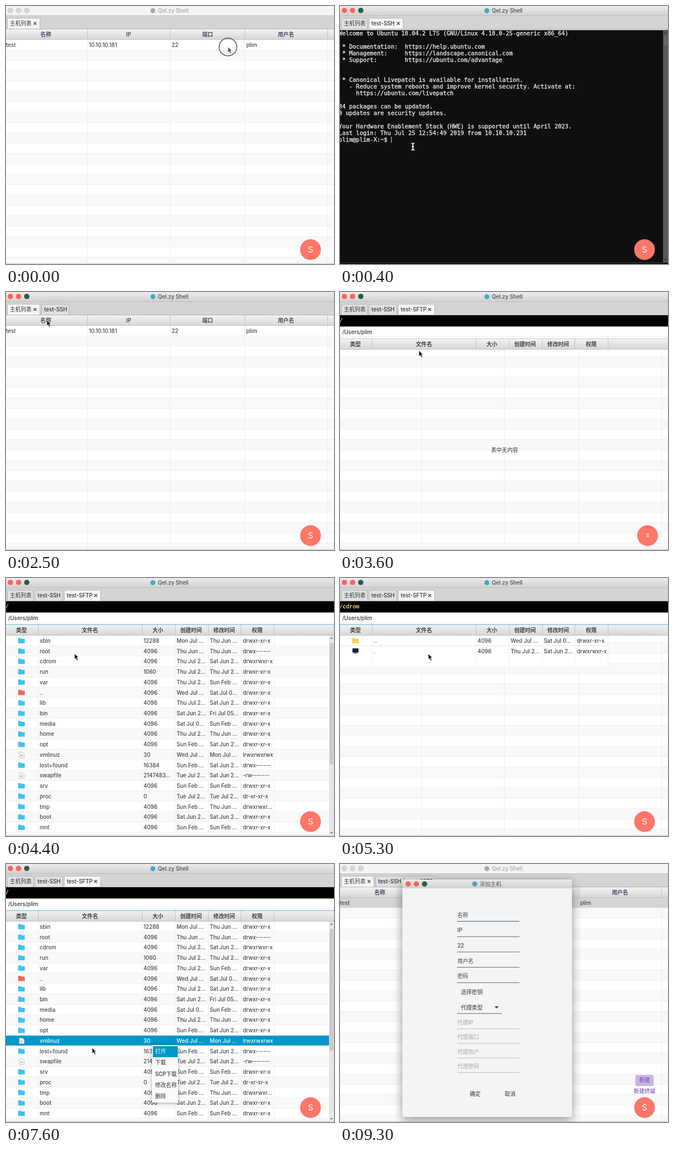
These frames come from a looping animation (594 px wide and 466 px high, 9.4 s). An HTML page:

```html
<!DOCTYPE html>
<html lang="zh">
<head>
<meta charset="utf-8">
<style>
html, body { margin: 0; width: 100%; height: 100%; overflow: hidden; background: #fff }
svg { display: block; font: 500 9.8px Inter, "Noto Sans CJK SC", "Noto Sans CJK", sans-serif }
text { white-space: pre }
.term { font: 10.47px "DejaVu Sans Mono", monospace }
.term text { stroke-width: .3px }
.path { font: bold 10px "Liberation Mono", monospace }
</style>
</head>
<body>
<svg id="stage" width="594" height="466" viewBox="0 0 594 466">
  <defs>
    <linearGradient id="bar" x2="0" y2="1"><stop stop-color="#ebebeb"/><stop offset="1" stop-color="#d0d0d0"/></linearGradient>
    <linearGradient id="head" x2="0" y2="1"><stop stop-color="#f3f3f3"/><stop offset="1" stop-color="#d6d6d6"/></linearGradient>
    <filter id="shadow" x="-20%" y="-20%" width="140%" height="140%"><feDropShadow dx="0" dy="5" stdDeviation="9" flood-opacity=".42"/></filter>
    <filter id="soft" x="-20%" y="-20%" width="140%" height="140%"><feDropShadow dx="0" dy="1" stdDeviation="3" flood-opacity=".35"/></filter>
  </defs>
  <g id="scene"></g>
</svg>
<script>
const LOOP = 9400, STEP = 100, ROW = 18.73, BLUE = '#0096c9';
const scene = document.getElementById('scene');
const APP = 'Qel.zy Shell', USER = 'plim', PROMPT = `${USER}@${USER}-X:`;

const rect = (x, y, w, h, fill, extra = '') =>
  `<rect x="${x}" y="${y}" width="${w}" height="${h}" fill="${fill}" ${extra}/>`;
const circle = (x, y, r, fill, extra = '') => `<circle cx="${x}" cy="${y}" r="${r}" fill="${fill}" ${extra}/>`;
const path = (d, fill, extra = '') => `<path d="${d}" fill="${fill}" ${extra}/>`;
const text = (x, y, s, fill = '#444', extra = '') =>
  `<text x="${x}" y="${y + 3.5}" fill="${fill}" ${extra}>${s}</text>`;
const mid = (x, y, s, fill, extra = '') => text(x, y, s, fill, 'text-anchor="middle" ' + extra);
const vline = (x, y, h, color) => rect(x, y, 1, h, color);

const lights = (x, y, active) => ['#ff6258', '#ff6258', '#2c5b48']
  .map((c, i) => circle(x + i * 14.8, y, 4.8, active ? c : '#d6d6d6', active ? '' : 'stroke="#c4c4c4" stroke-width=".6"')).join('');

function titleBar(active) {
  return rect(0, 0, 594, 18, active ? 'url(#bar)' : '#f4f4f4') + rect(0, 17, 594, 1, '#bdbdbd') +
    lights(8, 8, active) + circle(266, 8.5, 4.5, active ? '#4aa5c9' : '#aaa') +
    text(275, 8.5, APP, active ? '#4a4a4a' : '#a5a5a5');
}

function tabs(count, current) {
  const names = ['主机列表', 'test-SSH', 'test-SFTP'], widths = [48, 51, 55];
  let out = rect(0, 18, 594, 24, '#d4d4d4') + rect(0, 41, 594, 1, '#b4b4b4'), x = 2;
  for (let i = 0; i < count; i++) {
    const on = i === current, w = widths[i] + (on ? 12 : 0);
    out += path(`M${x + .5} 41V24q0-2 2-2h${w - 5}q2 0 2 2V41`, on ? '#f5f5f5' : '#e0e0e0', 'stroke="#b2b2b2"') +
      text(x + 5, 31.5, names[i], '#333');
    if (on) out += path(`M${x + w - 12} 29l5 5m0-5l-5 5`, 'none', 'stroke="#444" stroke-width="1.3"');
    x += w + 2;
  }
  return out;
}

function stripes(top, columns) {
  let out = rect(0, top, 594, 466 - top, '#fff');
  for (let i = 0, y = top; y < 463; y = top + ++i * ROW)
    out += rect(0, y, 594, ROW, i % 2 ? '#f9f9f9' : '#fff') + rect(0, y + ROW - 1, 594, 1, '#eee');
  return out + columns.map(x => vline(x, top, 466 - top, '#eee')).join('') + rect(0, 464.5, 594, 1.5, '#d5d5d5');
}

function header(y, h, columns, labels, color) {
  return rect(0, y, 594, h, 'url(#head)') + rect(0, y + h - 1, 594, 1, '#c2c2c2') +
    columns.map(x => vline(x, y, h, '#c4c4c4')).join('') +
    labels.map(([x, s]) => mid(x, y + h / 2, s, color, 'font-weight="600"')).join('');
}

const HOST_COLS = [147, 297, 432, 582];
function hostList(selection) {
  const fg = selection === BLUE ? '#fff' : '#444';
  return stripes(61, HOST_COLS) +
    header(42, 19, HOST_COLS, [[72, '名称'], [222, 'IP'], [365, '端口'], [507, '用户名']], '#4c4a62') +
    (selection ? rect(0, 61, 594, 18, selection) : '') +
    [[0, 'test'], [150, '10.10.10.181'], [300, '22'], [435, USER]].map(([x, s]) => text(x, 70, s, fg)).join('');
}

const GREETING = `Welcome to Ubuntu 18.04.2 LTS (GNU/Linux 4.18.0-25-generic x86_64)

 * Documentation:  https://help.ubuntu.com
 * Management:     https://landscape.canonical.com
 * Support:        https://ubuntu.com/advantage


 * Canonical Livepatch is available for installation.
   - Reduce system reboots and improve kernel security. Activate at:
     https://ubuntu.com/livepatch

84 packages can be updated.
0 updates are security updates.

Your Hardware Enablement Stack (HWE) is supported until April 2023.
Last login: Thu Jul 25 12:54:49 2019 from 10.10.10.231`.split('\n');

// Each command: directory, input, typing start, time of output, output colour and lines
const COMMANDS = [
  ['~', 'ls', 500, 800, '#6ea3d0', ['Desktop         Documents  jar    Pictures  Templates', 'Desktopcolorui  Downloads  Music  Public    Videos']],
  ['~', 'cd jar/', 800, 1500, '', []],
  ['~/jar', 'ls', 1500, 1700, '#e00b0b', ['jfoenix-9.0.8.jar  remotecontent.jar']],
  ['~/jar', '', 1700, LOOP, '', []]
];

function terminal(t) {
  const plain = '#f0f0f0', lines = GREETING.map(s => [s, plain]);
  for (const [dir, input, start, done, color, output] of COMMANDS) {
    const typed = input.slice(0, Math.max(0, Math.floor((t - start) / STEP)));
    lines.push([`${PROMPT}${dir}$ ${typed}`, plain]);
    if (t < done) break;
    lines.push(...output.map(s => [s, color]));
  }
  const last = lines.length - 1;
  let out = rect(0, 42, 594, 2, '#f2f2f2') + rect(0, 43.5, 594, 423, '#0f0f0f') + '<g class="term">' + lines.map(([s, c], i) =>
    text(-2.4, 49.5 + i * 12, s, c, c === plain ? `stroke="${c}"` : 'font-weight="bold"')).join('') + '</g>';
  if (Math.floor(t / 500) % 2 === 0) out += rect(lines[last][0].length * 6.303 - 2, 44 + last * 12, 1, 11, '#ddd');
  return out + rect(585, 43.5, 9, 419.5, '#575757') + rect(586, 54, 7, 18, '#666') +
    path('M587 50l2.5-3 2.5 3zM587 457l2.5 3 2.5-3z', '#333') + rect(0, 463, 594, 1, '#3b3636');
}

const FILE_COLS = [58, 246, 306, 366, 425, 485];
const DIR = 'drwxr-xr-x';
const ROOT = `sbin|12288|Mon Jul ...|Thu Jun ...
root|4096|Thu Jun ...|Thu Jun ...|drwx------
cdrom|4096|Thu Jul 2...|Sat Jun 2...|drwxrwxr-x
run|1060|Thu Jul 2...|Thu Jul 2...
var|4096|Thu Jul 2...|Sun Feb ...
..|4096|Wed Jul ...|Sat Jul 0...
lib|4096|Thu Jul 2...|Sat Jun 2...
bin|4096|Sat Jun 2...|Fri Jul 05...
media|4096|Sat Jul 0...|Sun Feb ...
home|4096|Thu Jul 2...|Thu Jun ...
opt|4096|Sun Feb ...|Sat Jun 2...
vmlinuz|30|Wed Jul ...|Mon Jul ...|lrwxrwxrwx
lost+found|16384|Sun Feb ...|Sat Jun 2...|drwx------
swapfile|2147483...|Tue Jul 2...|Sat Jun 2...|-rw-------
srv|4096|Sun Feb ...|Sun Feb ...
proc|0|Tue Jul 2...|Tue Jul 2...|dr-xr-xr-x
tmp|4096|Sun Feb ...|Thu Jun ...|drwxrwxr...
boot|4096|Sat Jun 2...|Sat Jun 2...
mnt|4096|Sun Feb ...|Sun Feb ...`.split('\n').map(s => s.split('|'));
const CDROM = [['..', '4096', 'Wed Jul ...', 'Sat Jul 0...'], ['.', '4096', 'Thu Jul 2...', 'Sat Jun 2...', 'drwxrwxr-x']];

function icon(name, y, inRoot) {
  if (name === '.') return rect(22.5, y - 5, 11, 7.5, '#17202c') + rect(26, y + 2, 4, 2, '#555') + rect(24.5, y + 3.5, 7, 1, '#777');
  if (/vmlinuz|swapfile/.test(name))
    return path(`M24 ${y - 5}h6l3 3v7h-9z`, '#f4f4f4', 'stroke="#bbb" stroke-width=".8"') + rect(26, y, 4, 2, '#aaa');
  const color = name !== '..' ? '#40c1f5' : inRoot ? '#f2685c' : '#f6d257';
  return path(`M22 ${y - 5}h5l1 1.5h6v8h-12z`, color);
}

function fileRows(rows, selected) {
  return rows.map(([name, size, created, changed, mode = DIR], i) => {
    const top = 104 + i * ROW, y = top + 9.4, on = i === selected;
    return (on ? rect(0, top, 585, ROW - 1, BLUE) : '') + icon(name, y, rows === ROOT) +
      [[61, name], [249, size], [309, created], [369, changed], [429, mode]]
        .map(([x, s]) => text(x, y, s, on ? '#fff' : '#444')).join('');
  }).join('');
}

function contextMenu() {
  return rect(264.5, 327, 47, 104, '#fafafa', 'filter="url(#soft)"') + rect(266, 329, 45, 20, BLUE) +
    ['打开', '下载', 'SCP下载', '修改名称', '删除'].map((s, i) => text(270, 338.5 + i * 20.3, s, i ? '#333' : '#fff')).join('');
}

function sftp(t) {
  const rows = t < 3700 ? [] : t >= 5000 && t < 5900 ? CDROM : ROOT, full = rows === ROOT;
  let out = full ? stripes(104, []) : stripes(61, HOST_COLS);
  if (rows === CDROM) out += rect(0, 104, 485, 56, '#fff') + rect(0, 122, 485, 1, '#e5e5e5');
  out += rect(0, 42, 594, 20, '#000') + `<g class="path">${text(-1, 51.5, rows === CDROM ? '/cdrom' : '/', '#f3cf83')}</g>` +
    rect(0, 62, 594, 22, '#fff') + rect(0, 62, 594, 1, '#aaa') + rect(0, 80, 594, 1, '#eee') + text(4, 72, '/Users/' + USER, '#333') +
    header(84, 20, FILE_COLS, [[28, '类型'], [152, '文件名'], [275, '大小'], [335, '创建时间'], [395, '修改时间'], [455, '权限']], '#444') +
    rect(0, 83.5, 594, 1, rows.length ? '#55a9cc' : '#c8c8c8') +
    FILE_COLS.map(x => rows.length ? vline(x, 104, full ? 362 : 56, '#f0f0f0') : '').join('') +
    fileRows(rows, full && t >= 7100 ? 11 : -1);
  if (!rows.length) out += mid(298, 285, '表中无内容', '#333');
  if (full) out += rect(585, 104, 9, 362, '#e6e6e6') + rect(586, 117, 7, 220, '#c9c9c9', 'rx="2"') +
    path('M587 110l2.5-3 2.5 3zM587 459l2.5 3 2.5-3z', '#777');
  return out + (t >= 7300 && t < 8000 ? contextMenu() : '');
}

function dialog(dx, dy) {
  const field = (y, s, gap, color, line) => text(212.5, y, s, color) + rect(212, y + gap, 113, 1, line);
  return `<g transform="translate(${dx} ${dy})">` +
    rect(113, 28, 307, 429, '#f4f4f4', 'rx="4" filter="url(#shadow)"') +
    path('M113 44V32q0-4 4-4h299q4 0 4 4v12z', 'url(#bar)') + lights(123.5, 36, true) +
    circle(244, 36, 4.5, '#4aa5c9') + text(253, 36, '添加主机', '#555') +
    ['名称', 'IP', '22', '用户名', '密码'].map((s, i) => field(92 + i * 27.7, s, 11, '#444', i ? '#666' : '#2b5f73')).join('') +
    text(219, 231, '选择密钥', '#333') + text(219, 259, '代理类型', '#333') + path('M279.5 257h8l-4 4z', '#444') +
    rect(212, 269.5, 81, 1, '#666') +
    ['代理IP', '代理端口', '代理用户', '代理密码'].map((s, i) => field(286.5 + i * 26.3, s, 10.7, '#aaa', '#bbb')).join('') +
    mid(245, 415, '确定', '#333') + mid(308, 415, '取消', '#333') + '</g>';
}

function floating(x, size, open) {
  return (open ? rect(535, 381, 33, 20, '#c9b3e6', 'rx="2"') + mid(551.5, 390.5, '新建', '#6f4a9c') + mid(551.5, 410.5, '新建终端', '#6a3fa0') : '') +
    circle(x, 440, 18.8, '#fd766a') + mid(x, 440 + (size - 10) * .35, 'S', '#fff', `font-size="${size}" font-weight="400"`);
}

// Pointer stops: time, x, y
const STOPS = [[0, 402, 74], [100, 402, 74], [400, 132, 254], [1000, 132, 254], [1900, 153, 299], [2100, 150, 290], [2300, 28, 32],
  [2700, 120, 70], [3000, 140, 90], [3600, 143, 106], [4200, 110, 130], [4700, 150, 149], [5000, 154, 146], [5300, 160, 137],
  [5700, 150, 115], [6300, 155, 180], [7100, 150, 318], [7600, 156, 332], [8000, 150, 300], [8300, 28, 32], [8700, 551, 440], [8850, 551, 392]];
const CLICKS = [0, 1900, 2300, 2700, 4700, 5000, 5700, 7100, 8300, 8700];

function pointer(t) {
  const next = STOPS.findIndex(s => s[0] > t);
  if (next < 0) return '';
  const [t0, x0, y0] = STOPS[next - 1], [t1, x1, y1] = STOPS[next], k = (t - t0) / (t1 - t0), e = k * k * (3 - 2 * k);
  const x = x0 + (x1 - x0) * e, y = y0 + (y1 - y0) * e, beam = t >= 300 && t < 2200;
  const ring = CLICKS.some(c => t >= c && t < c + 100)
    ? (beam ? circle(x, y, 12.5, 'none', 'stroke="#999" stroke-width="1.8"') : circle(x, y, 16, 'none', 'stroke="#4b4a60" stroke-width="1.4"')) : '';
  const shape = beam
    ? path(`M${x - 3} ${y - 6}q3 0 3 2v8q0 2-3 2m6-12q-3 0-3 2v8q0 2 3 2m-5-6h4`, 'none', 'stroke="#ddd" stroke-width="2"')
    : path(`M${x} ${y}v10l2.3-2 2 4 2-1-2-4h3z`, t < 300 ? '#4b4a60' : '#111', 'stroke="#fff" stroke-width=".6"');
  return ring + shape;
}

function draw(t) {
  const early = t < 300, ssh = t < 2200 && !early, late = t >= 8300;
  const host = early || late || (t >= 2300 && t < 3000);
  const view = host ? 0 : ssh || t < 2300 ? 1 : 2;
  const shown = early ? 1 : t < 3000 ? 2 : 3;
  const body = view === 0 ? hostList(late ? '#d4d4d4' : t >= 100 && early || t >= 2700 ? BLUE : '') : view === 1 ? terminal(t) : sftp(t);
  const sliding = t >= 3500 && t < 3700;
  let out = body + titleBar(t >= 300 && t < 8900) + tabs(shown, view) + floating(sliding ? 557 : 551.5, sliding ? 9.5 : 15, t >= 8700);
  if (t >= 8900) {
    const left = Math.max(0, Math.min(1, (9300 - t) / 200));
    out += dialog(133 * left, 2 * left);
  }
  return out + pointer(t);
}

let shownStep = -1;
function tick(now) {
  const t = Math.floor(now % LOOP / STEP) * STEP;
  if (t !== shownStep) scene.innerHTML = draw(shownStep = t);
  requestAnimationFrame(tick);
}
tick(performance.now());
</script>
</body>
</html>
```
